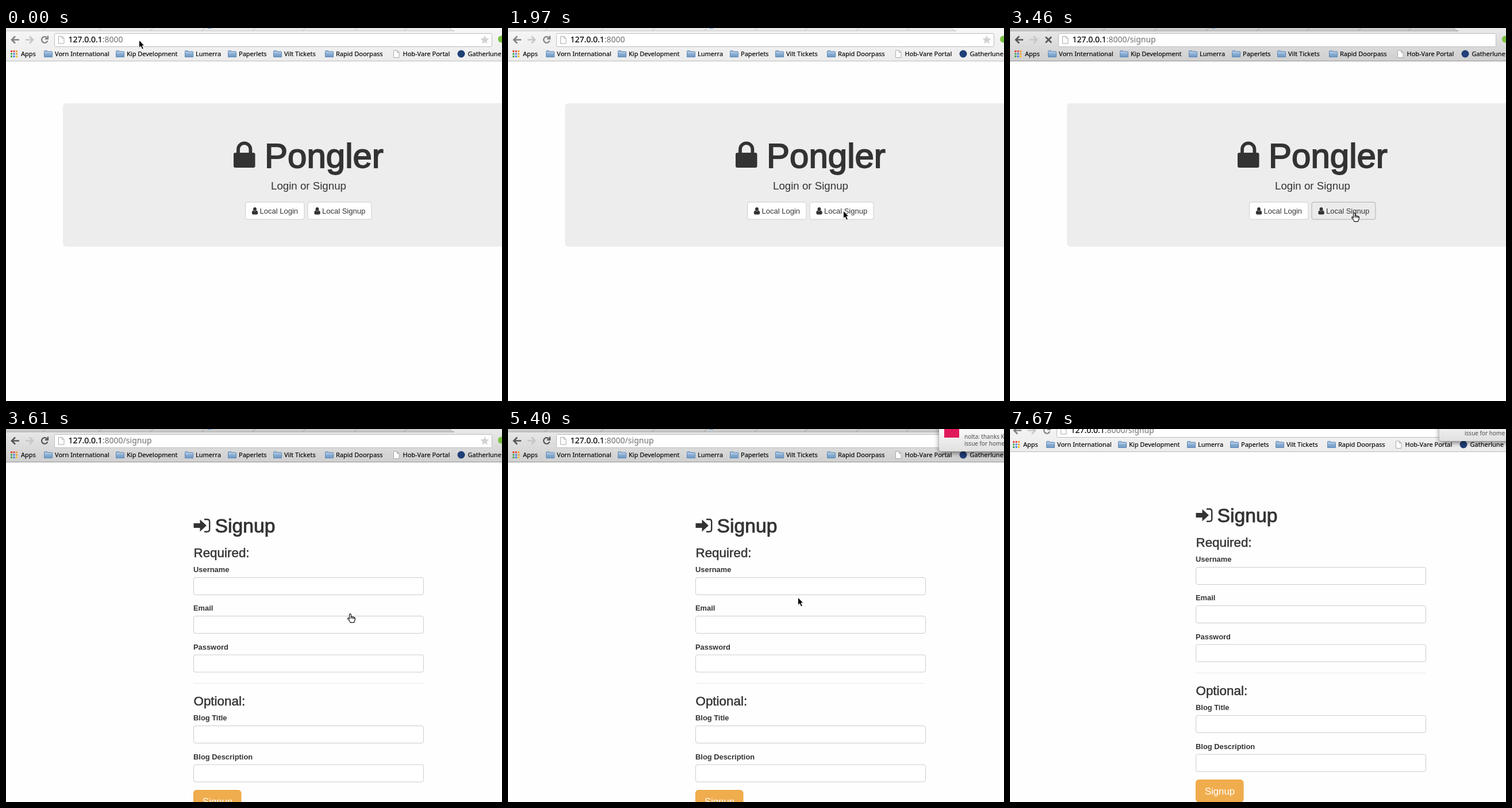
An HTML page for the animation above (8 s loop, 863x649 px).

```html
<!DOCTYPE html>
<html lang="en">
<head>
<meta charset="utf-8">
<title>Signup demo</title>
<style>
html, body { margin: 0; width: 100%; height: 100%; overflow: hidden; background: #fefefe; }
svg { display: block; }
text { white-space: pre; fill: #333; font-family: "Liberation Sans", Arial, sans-serif; }
.ui { font: 500 11px "Noto Sans", sans-serif; fill: #000; stroke: #000; stroke-width: .15; }
.url { font: 14px "Noto Sans", sans-serif; fill: #707070; }
.url .host { fill: #000; stroke: #000; stroke-width: .2; }
.note { font: 10px "Noto Sans", sans-serif; fill: #4c4c4c; }
.title { stroke: #333; stroke-width: 1.8; font-size: 60px; }
.heading { stroke: #333; stroke-width: .9; font-size: 33.7px; }
.section { stroke: #333; stroke-width: .5; font-size: 22.4px; }
.label { font-size: 12.9px; font-weight: bold; }
.field, .btn { fill: #fff; stroke: #ccc; }
.hover { fill: #ebebeb; stroke: #adadad; }
#bar { fill: url(#idleBar); }
#edge { stroke: #bcbcbc; }
#tabs { fill: #e8e8e8; stroke: #c4c4c4; }
#nav { fill: none; stroke: #828282; stroke-width: 2.6; }
.active #bar { fill: url(#activeBar); }
.active #edge { stroke: #949494; }
.active #tabs { fill: #cbcbcb; stroke: #a2a2a2; }
.active #nav { stroke: #555; }
</style>
</head>
<body>
<svg id="stage" width="863" height="649" viewBox="0 0 863 649">
  <defs>
    <linearGradient id="idleBar" x2="0" y2="1"><stop stop-color="#f6f6f6"/><stop offset="1" stop-color="#ececec"/></linearGradient>
    <linearGradient id="activeBar" x2="0" y2="1"><stop stop-color="#e9e9e9"/><stop offset="1" stop-color="#cfcfcf"/></linearGradient>
    <linearGradient id="blue" x2="0" y2="1"><stop stop-color="#a4c1e0"/><stop offset="1" stop-color="#6f99c6"/></linearGradient>
    <linearGradient id="noteFill" x2="0" y2="1"><stop offset=".5" stop-color="#f6f6f6"/><stop offset="1" stop-color="#e0e0e0"/></linearGradient>
    <filter id="shadow" x="-20%" y="-20%" width="140%" height="150%"><feDropShadow dx="0" dy="3" stdDeviation="4" flood-opacity=".5"/></filter>
    <g id="folder">
      <path d="M.5 11.5V1.5q0-1 1-1h4l1.5 1.5h6.5q1 0 1 1v8.5z" fill="url(#blue)" stroke="#6089b4"/>
      <path d="M1 4h13" stroke="#c3d7ec"/>
    </g>
    <path id="sheet" d="M.5.5h6l3.5 3.5v9h-9.5zM6.5.5v3.5h3.5" fill="#fff" stroke="#a9a9a9"/>
    <g id="user" fill="#333">
      <ellipse cx="5" cy="3.3" rx="2.9" ry="3.3"/>
      <path d="M2 5.5q3 2.6 6 0 2.3.6 2.3 4.5 0 2.4-2 2.4H1.8q-2 0-2-2.4Q-.2 6.1 2 5.5z"/>
    </g>
  </defs>

  <g id="screen">
    <g id="home">
      <rect x="99" y="131" width="790" height="249.5" rx="6" fill="#ededed"/>
      <rect x="396" y="217" width="37.500" height="26" rx="3" fill="#333"/>
      <path d="M404 219v-8a10.700 10.700 0 0 1 21.400 0v8" fill="none" stroke="#333" stroke-width="5.800"/>
      <text class="title" x="450" y="243">Pongler</text>
      <text x="461" y="281" font-size="18.7">Login or Signup</text>
      <rect class="btn" x="416.5" y="303" width="102.5" height="30" rx="3.5"/>
      <rect class="btn" id="signupBtn" x="525" y="303" width="111" height="30" rx="3.5"/>
      <use href="#user" x="428" y="312"/>
      <use href="#user" x="536.5" y="312"/>
      <text x="441.5" y="323" font-size="13">Local Login</text>
      <text x="550" y="323" font-size="13">Local Signup</text>
    </g>

    <g id="form">
      <path d="M326.5 164h11v-6.500L349 168l-11.5 10.5V172h-11z" fill="#333"/>
      <path d="M345 157.3h5q4.200 0 4.200 4.200v13q0 4.200-4.200 4.200h-5" fill="none" stroke="#333" stroke-width="2.4"/>
      <text class="heading" x="363.5" y="180">Signup</text>
      <text class="section" x="326.5" y="223">Required:</text>
      <path d="M326 442.5h400" stroke="#e8e8e8"/>
      <text class="section" x="326.5" y="481">Optional:</text>
      <g id="fields"></g>
      <rect x="326.5" y="628.5" width="82.5" height="38.5" rx="5" fill="#f0ad4e" stroke="#eea236"/>
      <text x="342" y="654" font-size="16.7" style="fill:#fff">Signup</text>
    </g>

    <rect id="bar" width="890" height="57"/>
    <g id="tabs"></g>
    <path id="edge" d="M0 57.5h890"/>
    <rect x="84.5" y="9.5" width="761" height="23" rx="2" fill="#fff" stroke="#bdbdbd"/>
    <g id="nav">
      <path d="M23 20.5H11M16 14.5l-6 6 6 6"/>
      <path d="M34 20.5h12M41 14.5l6 6-6 6" stroke="#c6c6c6"/>
      <path id="reload" d="M71.5 17.2a5.3 5.3 0 1 0 .8 5M73 13.5v5.3h-5.2" stroke-width="2.2"/>
      <path id="stop" d="M62 15.5l10 10M72 15.5l-10 10"/>
    </g>
    <use href="#sheet" x="91" y="14"/>
    <text class="url" x="108.5" y="25"><tspan class="host">127.0.0.1</tspan>:8000<tspan id="path"></tspan></text>
    <path id="star" d="M833 13l2.2 5 5.4.5-4.1 3.6 1.3 5.4-4.8-2.9-4.8 2.900 1.3-5.4-4.1-3.6 5.4-.5z" fill="#d2d2d2"/>
    <circle cx="862" cy="19.500" r="6" fill="#7cc242"/>
    <g id="bookmarks"></g>

    <g id="note">
      <rect x="750" y="-30" width="330" height="69" rx="5" fill="url(#noteFill)" filter="url(#shadow)"/>
      <rect x="759" y="-11" width="26" height="26" fill="#e0195a"/>
      <text class="note" x="794" y="17">nolta: thanks K</text>
      <text class="note" x="794" y="29">issue for home</text>
    </g>
  </g>

  <g id="cursor">
    <path id="arrow" d="M.5 0v13.5l3-2.7 2.3 5.2 2.5-1.1L6 9.8h4z" fill="#000" stroke="#fff" stroke-width=".9"/>
    <path id="hand" d="M-2.5 6V1.2q0-1.5 1.4-1.5T.4 1.2V5q2-1 2.7.4 1.8-.8 2.4.6 2-.3 2 1.6 0 4-2 7H-1Q-2 11.5-5 8.6q-.8-1.5.6-1.900 1.1 0 1.900 1.3zM.4 5v3M3.1 5.4v3M5.5 6v2.5" fill="#fff" stroke="#111" stroke-width="1.2"/>
  </g>
</svg>

<script>
const LOOP = 8000;
const $ = id => document.getElementById(id);
const show = (id, on) => $(id).setAttribute("display", on ? "inline" : "none");
const shift = (id, x, y) => $(id).setAttribute("transform", `translate(${x} ${y})`);

$("fields").innerHTML = [
  ["Username", 258.5], ["Email", 325.5], ["Password", 393],
  ["Blog Title", 516.5], ["Blog Description", 584]
].map(([name, y]) => `<text class="label" x="326" y="${y - 9.5}">${name}</text>
  <rect class="field" x="326.5" y="${y}" width="400" height="30" rx="3.5"/>`).join("");

const folders = [
  ["Vorn International", 66], ["Kip Development", 191], ["Lumerra", 311],
  ["Paperlets", 386], ["Vilt Tickets", 465], ["Rapid Doorpass", 555]
];
const label = (text, x) => `<text class="ui" x="${x}" y="49">${text}</text>`;
const dots = ["#e5443a", "#e5443a", "#f0a03c", "#4aa657", "#3f7fe0", "#f0a03c", "#4aa657", "#3f7fe0", "#f2c230"];
$("bookmarks").innerHTML =
  dots.map((c, i) => `<rect x="${8 + i % 3 * 4.5}" y="${39 + Math.floor(i / 3) * 4.5}" width="3" height="3" fill="${c}"/>`).join("") +
  label("Apps", 26) +
  folders.map(([name, x]) => `<use href="#folder" x="${x}" y="39"/>` + label(name, x + 19)).join("") +
  `<use href="#sheet" x="674" y="38.5"/>` + label("Hob-Vare Portal", 690.5) +
  `<circle cx="792" cy="45" r="6.5" fill="#1f3f77"/>` + label("Gatherlune", 803.5);

$("tabs").innerHTML = `<path d="M-1 -1H772q2 6 8 6H-1z"/>` +
  [68, 165, 255, 345, 433, 520, 610, 697].map(x => `<path d="M${x - 5} 5q4-1 6-6" fill="none"/>`).join("") +
  `<rect x="351" y="-1" width="6" height="2" fill="#4a9be0" stroke="none"/>`;

// Progress of a move made in n equal jumps, the first at t0 and the last at t1.
const jumps = (t, t0, t1, n) =>
  t < t0 ? 0 : Math.min(1, (Math.floor((t - t0) / (t1 - t0) * (n - 1) + .01) + 1) / n);
const smooth = p => p * p * (3 - 2 * p);

// [first jump, last jump, jumps, x, y]
const legs = [
  [500, 1530, 8, 556, 281], [1670, 1970, 3, 583, 318], [3010, 3160, 2, 600, 322],
  [4060, 4360, 3, 502, 293], [5110, 5400, 3, 504, 293],
  [5700, 5840, 2, 768, 479], [6140, 6430, 3, 893, 533]
];

function pointer(t) {
  let x = 231, y = 21;
  for (const [t0, t1, n, toX, toY] of legs) {
    let p = jumps(t, t0, t1, n);
    if (n > 3) p = smooth(p);
    x += (toX - x) * p;
    y += (toY - y) * p;
  }
  return [x, y];
}

function draw(t) {
  const onForm = t >= 3610, hand = t >= 3010 && t < 4060;
  const loading = t >= 3460 && !onForm;
  $("stage").classList.toggle("active", t >= 2560 && t < 7170);
  $("signupBtn").classList.toggle("hover", t >= 3010);
  $("path").textContent = t >= 3460 ? "/signup" : "";
  show("home", !onForm);
  show("form", onForm);
  show("reload", !loading);
  show("stop", loading);
  show("star", !loading);
  show("hand", hand);
  show("arrow", !hand);

  show("note", t >= 5110);
  shift("note", 130 * (1 - jumps(t, 5110, 5400, 3)), 0);
  const pan = jumps(t, 7540, 7670, 2);
  shift("screen", -Math.round(3 * pan), -18 * pan);
  shift("cursor", ...pointer(t));
}

function tick() {
  draw(performance.now() % LOOP);
  requestAnimationFrame(tick);
}
tick();
</script>
</body>
</html>
```
